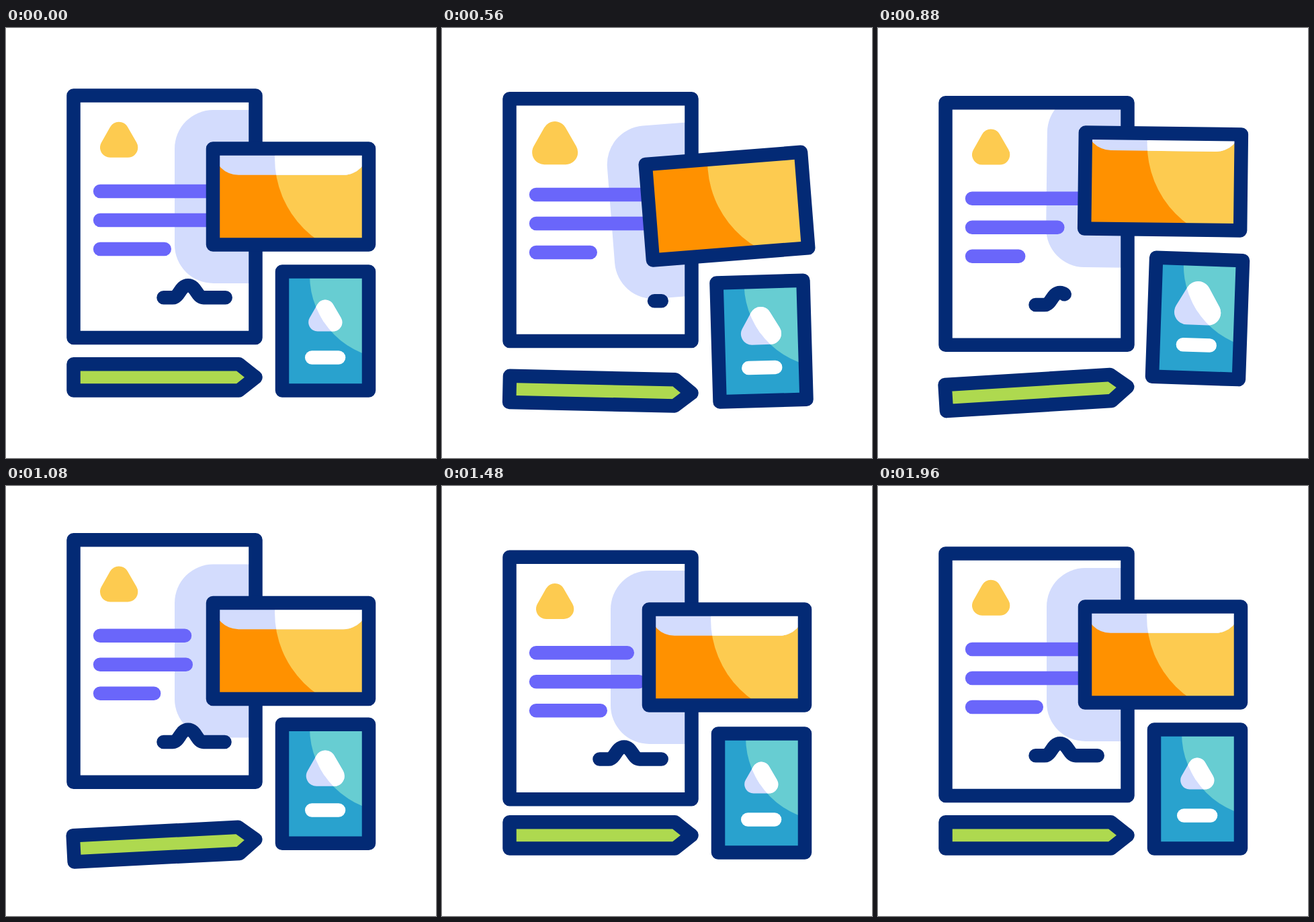
Write an HTML page that moves like this. It is 640x640 px and loops after 2160 ms.

```html
<!DOCTYPE html>
<html lang="en">
<head>
<meta charset="utf-8">
<title>Stationery</title>
<style>
  html, body { margin: 0; width: 100%; height: 100%; overflow: hidden; background: #fff; }
  svg { display: block; width: 100vw; height: 100vh; }
  .edge { fill: none; stroke: #032a75; stroke-width: 20.5; stroke-linejoin: round; stroke-linecap: round; }
  .bar { fill: #6a66fa; }
  .logo { fill: #fdcb50; stroke: #fdcb50; stroke-width: 30; stroke-linejoin: round; }
  .mark { stroke-width: 27; stroke-linejoin: round; }
  .pale { fill: #d3dcfd; stroke: #d3dcfd; }
  .white { fill: #fff; stroke: #fff; }
  .flap { stroke: none; }
</style>
</head>
<body>
<svg viewBox="0 0 640 640">
  <defs>
    <rect id="cardBox" x="308" y="179.5" width="232" height="143"/>
    <rect id="badgeBox" x="411" y="362.5" width="129" height="177"/>
    <circle id="cardDisc" cx="548" cy="194" r="148"/>
    <circle id="badgeDisc" cx="577" cy="368" r="125"/>
    <path id="markShape" d="M475.2 418L463.7 438H486.9Z"/>
    <rect id="flapShape" x="309" y="120" width="230" height="98.8" rx="37"/>
    <clipPath id="sheetClip"><rect x="105" y="105" width="262" height="351"/></clipPath>
    <clipPath id="cardClip"><use href="#cardBox"/></clipPath>
    <clipPath id="badgeClip"><use href="#badgeBox"/></clipPath>
    <clipPath id="cardArc"><use href="#cardDisc"/></clipPath>
    <clipPath id="badgeArc"><use href="#badgeDisc"/></clipPath>
  </defs>

  <g id="pencil">
    <path class="edge" style="fill:#aed94f" d="M100.5 500.3H346.7L371.5 519.9L346.7 539.5H100.5Z"/>
  </g>

  <g id="sheet">
    <rect x="100.5" y="100.5" width="271" height="360.6" fill="#fff"/>
    <g clip-path="url(#sheetClip)">
      <rect id="blob" x="251" y="122" width="346" height="258" rx="57.5" fill="#d3dcfd"/>
    </g>
    <path id="logo" class="logo" d="M168 154.8L155 177.8H181.3Z"/>
    <rect id="bar2" class="bar" x="129.8" y="232.8" height="20.5" rx="10.25"/>
    <rect id="bar1" class="bar" x="129.8" y="275.8" height="20.5" rx="10.25"/>
    <rect id="bar0" class="bar" x="129.8" y="318.8" height="20.5" rx="10.25"/>
    <path id="squiggle" class="edge" pathLength="1" d="M234.5 401.3H248C258 401.3 259 383.2 271 383.2S284 401.3 294 401.3H326.7"/>
    <rect class="edge" x="100.5" y="100.5" width="271" height="360.6"/>
  </g>

  <g id="badge">
    <g clip-path="url(#badgeClip)">
      <use href="#badgeBox" fill="#29a2ce"/>
      <use href="#badgeDisc" fill="#67cdd2"/>
    </g>
    <use id="markBack" class="mark pale" href="#markShape"/>
    <g clip-path="url(#badgeArc)"><use id="markFront" class="mark white" href="#markShape"/></g>
    <rect x="445" y="480.2" width="60.3" height="20.5" rx="10.25" fill="#fff"/>
    <use href="#badgeBox" class="edge"/>
  </g>

  <g id="card">
    <g clip-path="url(#cardClip)">
      <use href="#cardBox" fill="#ff9100"/>
      <use href="#cardDisc" fill="#fdcb50"/>
      <use id="flapBack" class="pale flap" href="#flapShape"/>
      <g clip-path="url(#cardArc)"><use id="flapFront" class="white flap" href="#flapShape"/></g>
    </g>
    <use href="#cardBox" class="edge"/>
  </g>
</svg>
<script>
const LOOP = 2160, STEP = 40;
const $ = id => document.getElementById(id);
const move = (id, transform) => $(id).setAttribute('transform', transform);

// Sine ease from 0 to 1 between two times.
function ease(t, from, to) {
  const p = Math.min(1, Math.max(0, (t - from) / (to - from)));
  return (1 - Math.cos(Math.PI * p)) / 2;
}

// Up to 1 at the peak, then back to 0.
const pulse = (t, from, peak, to) => ease(t, from, peak) - ease(t, peak, to);

// Dip down, spring up, settle through a smaller dip.
function bounce(t, start, rise = 305, fall = 375, low = -23) {
  const high = 20, last = 9.8;
  const a = start + rise, b = a + fall, c = b + 450;
  return high * ease(t, start, a) + (low - high) * ease(t, a, b)
    + (last - low) * ease(t, b, c) - last * ease(t, c, c + 330);
}

// A sine swing that fades out.
function wobble(t, start, period, angle, fade, end) {
  if (t < start) return 0;
  return angle * Math.sin(2 * Math.PI * (t - start) / period) * (1 - ease(t, fade, end));
}

const pose = (y, turn, cx, cy) => `translate(0 ${y}) rotate(${turn} ${cx} ${cy})`;
const grow = (s, cx, cy) => `translate(${cx} ${cy}) scale(${s}) translate(${-cx} ${-cy})`;

function draw(t) {
  const sheetY = bounce(t, 460);
  const cardPose = pose(bounce(t, 165), wobble(t, 120, 700, 10.6, 120, 1110), 424, 251);
  move('sheet', `translate(0 ${sheetY})`);
  move('card', cardPose);
  move('blob', `translate(0 ${-sheetY}) ${cardPose}`);
  move('badge', pose(bounce(t, 300, 160, 430, -18.6), wobble(t, 190, 600, 2.45, 950, 1090), 475.5, 451));
  move('pencil', pose(23 * (ease(t, 195, 660) - ease(t, 820, 1390)), wobble(t, 0, 1260, 3.7, 1200, 1450), 236, 520));

  move('logo', grow(1 + 0.25 * pulse(t, 100, 460, 840), 168, 166.5));
  const mark = grow(1 + 0.41 * pulse(t, 330, 800, 1260), 475.3, 428);
  const flap = `translate(0 ${-32 * pulse(t, 148, 600, 1105)})`;
  for (const side of ['Back', 'Front']) {
    move('mark' + side, mark);
    move('flap' + side, flap);
  }

  // The bars shrink one after another, lowest first.
  for (let i = 0; i < 3; i++) {
    const start = 405 + 220 * i, full = i ? 179.2 : 116.2;
    $('bar' + i).setAttribute('width', full - (30 + 4 * i) * pulse(t, start, start + 310, start + 1060));
  }

  // The squiggle is wiped from its start, then written again.
  const wiped = ease(t, 158, 663);
  const from = wiped < 1 ? wiped : 0;
  const length = wiped < 1 ? 1 - wiped : ease(t, 663, 1110);
  const line = $('squiggle').style;
  line.visibility = length > 0.002 ? 'visible' : 'hidden';
  line.strokeDasharray = length === 1 ? 'none' : `${length} 2`;
  line.strokeDashoffset = -from;
}

const start = performance.now();
function tick() {
  const t = (performance.now() - start) % LOOP;
  draw(Math.floor(t / STEP) * STEP);
  requestAnimationFrame(tick);
}
tick();
</script>
</body>
</html>
```
